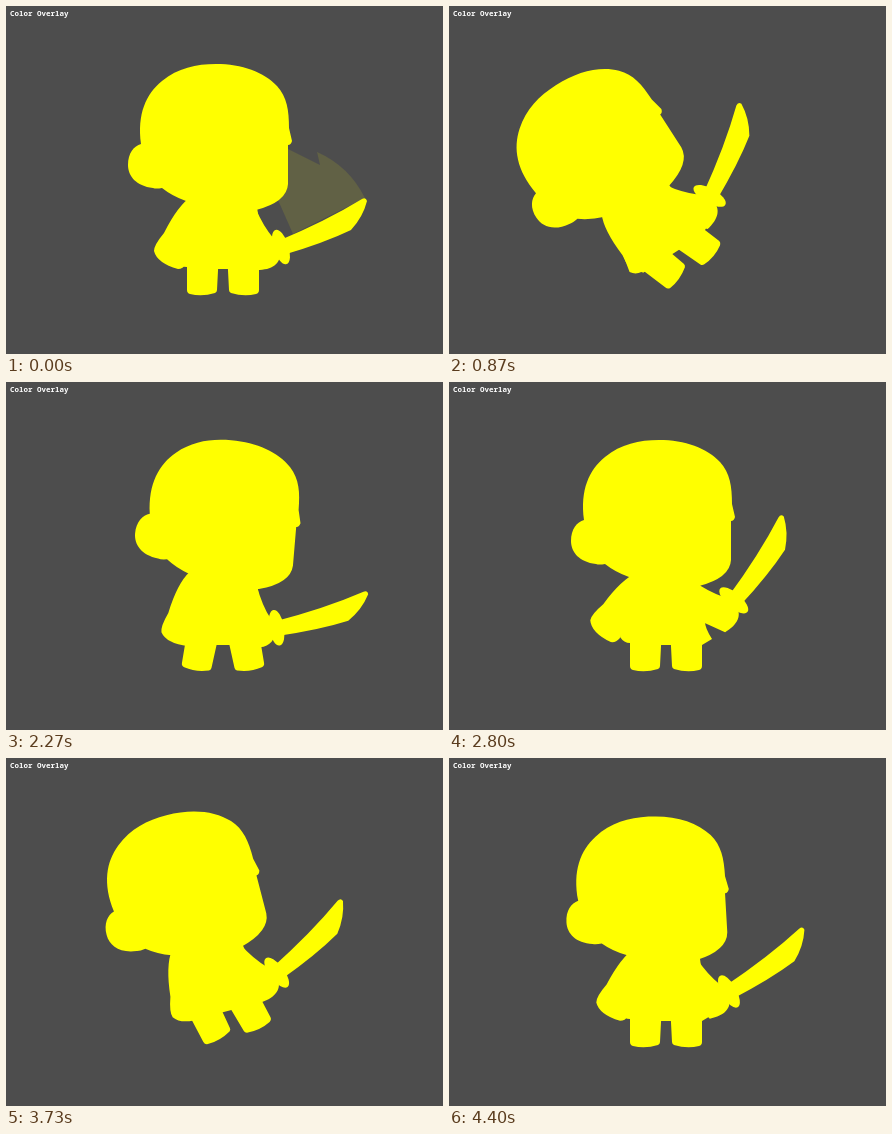
An HTML page for the animation above (4.47 s loop, 437 by 348 pixels).

```html
<!DOCTYPE html>
<html lang="en">
<head>
<meta charset="utf-8">
<title>Color Overlay</title>
<style>
  html, body { margin: 0; width: 100%; height: 100%; overflow: hidden; background: #4d4d4d; }
  svg { display: block; width: 437px; height: 348px; }
  text { font: 700 7.5px "Noto Sans Mono", "DejaVu Sans Mono", monospace; fill: #fff; }
</style>
</head>
<body>
<svg viewBox="0 0 437 348" fill="#ff0">
  <path id="trail" d="M287 228L268 185L270 138L282 143L314 159L311 146Q343 160 359 192Z"/>
  <g id="root">
    <g id="legB"><path id="leg" d="M181 245V284Q181 287 184 288Q196 291 209 287Q211 286 211 284L213 245Z"/></g>
    <g id="legF"><use href="#leg" transform="matrix(-1 0 0 1 434 0)"/></g>
    <path id="torso" d="M186 185L171 255Q175 261 181 261L182 263H253L263 257Q256 246 256 240L249 185Z"/>
    <path id="armB" d="M186 190Q172 199 158 227Q148 239 148 245Q151 257 172 263Q177 263 180 258L196 205Z"/>
    <g id="armF">
      <path d="M238 204L250 203Q257 220 268 233L274 246C275 258 266 264 251 264L238 245Z"/>
      <path d="M272 235Q320 215 356 193Q360 191 361 195Q357 211 345 224Q318 237 277 249Z"/>
      <ellipse cx="275" cy="241" rx="7.5" ry="18" transform="rotate(-18 275 241)"/>
    </g>
    <path id="head" d="M135 138C131 108 140 88 156 75C172 62 190 58 210 58C236 58 258 66 271 80C281 91 283 104 283 122L286 135Q285 139 282 139V178Q281 196 250 204Q210 210 180 195Q166 190 156 182Q150 183 147 182C130 180 122 170 122 159C122 147 128 140 135 138Z"/>
  </g>
  <text x="4" y="10">Color Overlay</text>
</svg>
<script>
const LOOP = 4470, STEP = 200 / 3;
const CYCLE = 45, OFFSET = 28; // in steps

const joints = {
  root: [215, 240], head: [215, 240], armB: [184, 203],
  armF: [239, 212], legB: [197, 252], legF: [237, 252]
};
const el = id => document.getElementById(id);
const wave = p => Math.sin(Math.PI * p);

// Each action maps its progress to joint angles in degrees.
function idle(p) {
  const s = wave(p);
  return { head: -3.5 * s, armF: -11.7 * s, armB: s };
}

function walk(p) {
  const s = wave(2 * p);
  return { head: .6 - 4.4 * s, armF: -8.5 * s, armB: 10 * s, legB: -10 * s, legF: 10 * s };
}

function attack(p) {
  const swung = p > .75;
  return {
    head: -3.6 * Math.max(0, wave(p / .6)),
    armB: 10.8 * wave(p),
    armF: swung ? 88 * (1 - p) : -42 * (p / .75) ** 1.66,
    trail: swung ? .11 + 3 * (1 - p) : 0
  };
}

function hurt(p) {
  return { root: -4 * wave(p) };
}

function die(p) {
  const drop = p ** 8;
  return {
    root: -91 * p * p,
    x: 28 * drop - 10 * p,
    y: 97 * drop - 20 * p,
    armB: -52 * p,
    armF: -28 * p ** 2,
    legB: -33 * p,
    legF: -33 * p
  };
}

function poseAt(c) {
  if (c < 10) return idle(c / 10);
  if (c < 20) return walk((c - 10) / 10);
  if (c <= 28) return attack((c - 20) / 8);
  if (c < 35) return hurt((c - 28) / 7);
  return die((c - 35) / 10);
}

function draw(t) {
  const step = Math.min(66, Math.floor((t + 4) / STEP));
  const pose = poseAt((step + OFFSET) % CYCLE);
  for (const id in joints) {
    el(id).setAttribute('transform', `rotate(${pose[id] || 0} ${joints[id].join(' ')})`);
  }
  const root = el('root');
  root.setAttribute('transform',
    `translate(${pose.x || 0} ${pose.y || 0}) ${root.getAttribute('transform')}`);
  el('trail').setAttribute('opacity', pose.trail || 0);
}

const start = performance.now();
function tick(now) {
  draw(Math.max(0, now - start) % LOOP);
  requestAnimationFrame(tick);
}
draw(0);
requestAnimationFrame(tick);
</script>
</body>
</html>
```
